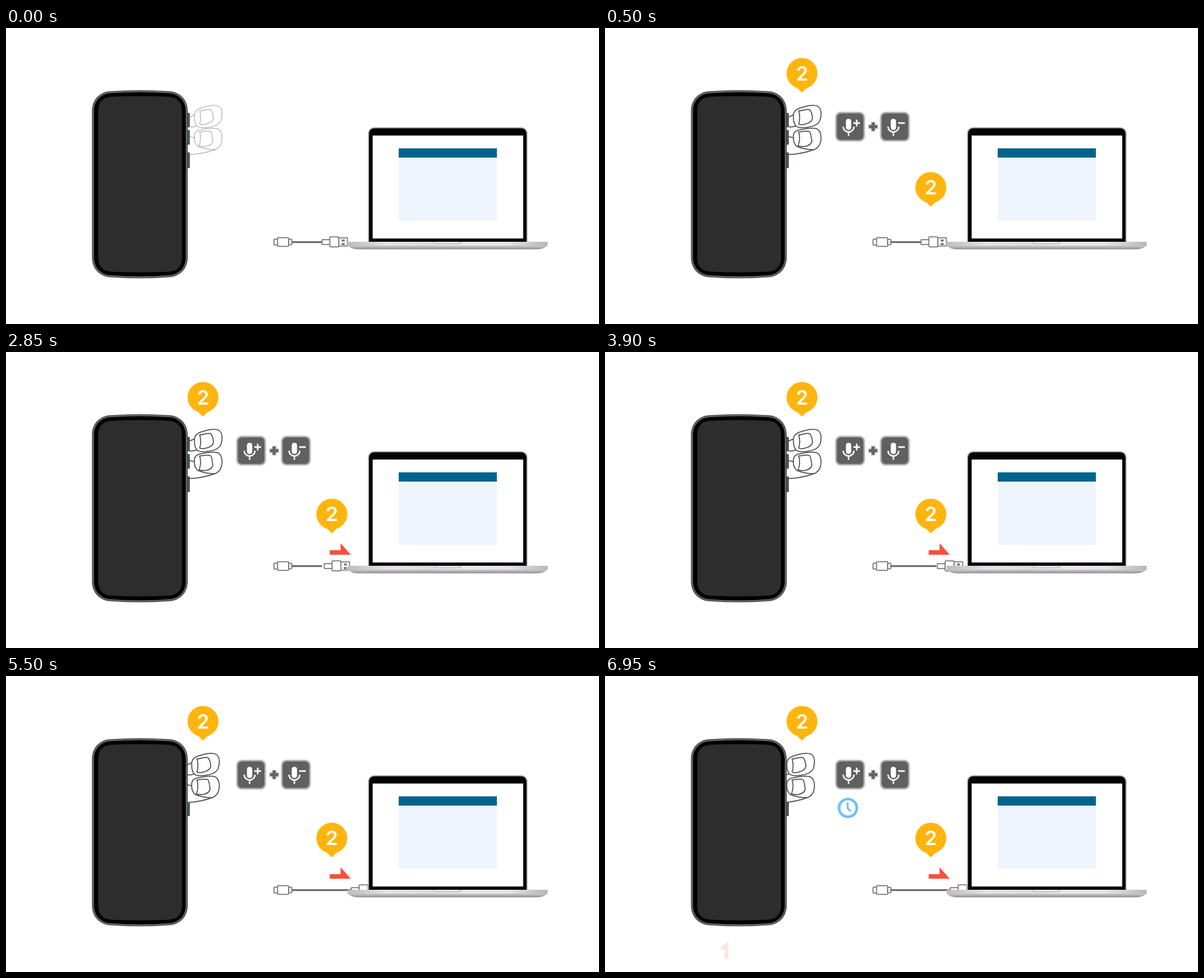
An HTML page with a canvas that plays this animation: 900x450 px, repeating every 8 s.

```html
<!DOCTYPE html>
<html lang="en">
<head>
<meta charset="utf-8">
<title>Connect the phone</title>
<style>
html, body { margin: 0; width: 100%; height: 100%; overflow: hidden; background: #fff; }
canvas { display: block; width: 900px; height: 450px; }
</style>
</head>
<body>
<canvas id="stage" width="900" height="450"></canvas>
<script>
const ctx = document.getElementById('stage').getContext('2d');
const LOOP = 8000, STEP = 50;
const RED = '#fa4f3b', LINE = '#4d4d4f', METAL = '#747476';

const ramp = (t, a, b) => Math.min(1, Math.max(0, (t - a) / (b - a)));
const easeOut = (p, n = 2) => 1 - Math.pow(1 - p, n);

function paint(path, fill, stroke, width = 1.5) {
  if (fill) { ctx.fillStyle = fill; ctx.fill(path); }
  if (stroke) { ctx.strokeStyle = stroke; ctx.lineWidth = width; ctx.stroke(path); }
}

function box(x, y, w, h, r, fill, stroke, width) {
  const p = new Path2D();
  p.roundRect(x, y, w, h, r);
  paint(p, fill, stroke, width);
}

function svg(d, fill, stroke, width) { paint(new Path2D(d), fill, stroke, width); }

function layer(alpha, x, y, draw) {
  if (alpha <= 0) return;
  ctx.save();
  ctx.globalAlpha = alpha;
  ctx.translate(x, y);
  draw();
  ctx.restore();
}

function gradient(x0, y0, x1, y1, ...colors) {
  const g = ctx.createLinearGradient(x0, y0, x1, y1);
  colors.forEach((c, i) => g.addColorStop(i / (colors.length - 1), c));
  return g;
}

// Rounded slab whose top and bottom edges bulge slightly.
function slab(x0, y0, x1, y1, r, bulge, fill) {
  const a = y0 + bulge, b = y1 - bulge, mid = (x0 + x1) / 2;
  const p = new Path2D();
  p.moveTo(x0, a + r);
  p.bezierCurveTo(x0, a + r * .42, x0 + r * .42, a, x0 + r, a);
  p.quadraticCurveTo(mid, y0 - bulge, x1 - r, a);
  p.bezierCurveTo(x1 - r * .42, a, x1, a + r * .42, x1, a + r);
  p.lineTo(x1, b - r);
  p.bezierCurveTo(x1, b - r * .42, x1 - r * .42, b, x1 - r, b);
  p.quadraticCurveTo(mid, y1 + bulge, x0 + r, b);
  p.bezierCurveTo(x0 + r * .42, b, x0, b - r * .42, x0, b - r);
  p.closePath();
  paint(p, fill);
}

function sideKeys() {
  for (const [y, h] of [[129, 22], [155, 22.5], [189, 24]]) {
    box(272, y, 7, h, 1.5, '#4a5359');
  }
}

function phone() {
  slab(130.5, 94.5, 275.8, 380.5, 30, 1.5, '#47494b');
  slab(131.8, 95.8, 274.5, 379.2, 29, 1.5, '#6a6c6e');
  slab(133.5, 97.5, 272.8, 377.5, 27, 1.5, '#000');
  slab(140, 103.5, 267, 371.5, 20, 1, '#2d2d2d');
}

function hand() {
  ctx.lineJoin = ctx.lineCap = 'round';
  ctx.fillStyle = '#fff';
  ctx.fillRect(279, 128, 12, 62);
  svg('M279 192.5 C292 192 306 189 317 185 L290 180 L279 180 Z', '#fff');
  svg('M278 192.5 C292 192 306 189 317 185', null, LINE);
  svg('M279 135 Q282 134 286 132 M279 150.5 Q284 151 289 149 M279 165 L286 167', null, LINE);
  svg('M286 136 C285 128 290 123 298 121 C306 118 317 116 323 119 C329 123 329 133 326 141 C323 148 315 150 307 151 C300 152 293 152 290 149 C287 146 286 141 286 136 Z', '#fff', LINE);
  svg('M294 126 C300 126 305 123 310 124 C314 126 314 132 315 137 C314 142 309 145 304 146 Q298 148 294 146 C296 140 296 133 294 126 Z', '#fff', LINE);
  svg('M286 168 C285 160 288 156 295 155 C303 153 314 151 321 153 C328 156 329 166 327 174 Q325 182 317 185 C309 185 298 183 291 180 C288 177 286 173 286 168 Z', '#fff', LINE);
  svg('M294 158 C300 158 307 155 311 158 C313 162 313 167 314 172 C313 177 309 179 304 180 Q298 181 293 179 C296 172 296 165 294 158 Z', '#fff', LINE);
}

function pin() {
  svg('M-10 19 L-1.5 28 Q0 29.5 1.5 28 L10 19 Z', '#ffb50e');
  box(-23.5, -23.5, 47, 47, 23.5, '#ffb50e');
  ctx.fillStyle = '#fff';
  ctx.font = '600 30px Inter, "Open Sans", sans-serif';
  ctx.textAlign = 'center';
  ctx.fillText('2', 0, 10.5);
}

function micKey(x, plus) {
  layer(ctx.globalAlpha, x, 150, () => {
    box(-23.5, -23.5, 47, 47, 9, '#e3e3e3');
    box(-22, -22, 44, 44, 8, '#a5a5a5');
    box(-20, -20, 40, 40, 6, '#606060');
    ctx.lineCap = 'butt';
    box(-6.3, -12, 8, 17, 4, '#fff');
    svg('M-10.5 0 A8.2 8.2 0 0 0 5.9 0 M-2.3 8 V14', null, '#fff', 2.2);
    svg('M5 -5.5 H15' + (plus ? ' M10 -10.5 V-.5' : ''), null, '#fff', 2.4);
  });
}

function keys() {
  micKey(372, true);
  micKey(440, false);
  svg('M399.5 150 H414.5 M407 142.5 V157.5', null, '#dedede', 7);
  svg('M400.5 150 H413.5 M407 143.5 V156.5', null, '#656565', 5);
}

function cable(reach) {
  ctx.lineCap = 'butt';
  ctx.lineJoin = 'miter';
  svg(`M434 325.5 H${479.5 + reach}`, null, METAL, 3);
  box(406.7, 321, 6, 9, 1, '#fff', METAL, 1.5);
  box(412.2, 318.7, 16.8, 13.3, 1, '#fff', METAL, 1.5);
  box(429, 321.2, 4.8, 8.4, .5, '#fff', METAL, 1.5);
}

function plug() {
  box(479.7, 321.7, 12, 7.6, .5, '#fff', METAL, 1.5);
  box(505, 319, 13.2, 12.6, .5, '#fff', METAL, 1.5);
  box(491.5, 317.6, 13.5, 15.2, 1, '#fff', METAL, 1.5);
  ctx.fillStyle = METAL;
  ctx.fillRect(509.5, 321.5, 4.5, 3);
  ctx.fillRect(509.5, 327, 4.5, 3);
}

function laptop() {
  box(549.5, 151, 242, 176, [9, 9, 0, 0], '#a3a3a5');
  box(551, 152.5, 239, 174, [8, 8, 0, 0], '#050505');
  ctx.fillStyle = '#fff';
  ctx.fillRect(556.5, 163.5, 228.5, 156.5);
  ctx.fillStyle = '#eff4fd';
  ctx.fillRect(596, 196, 149, 97);
  ctx.fillStyle = '#00638d';
  ctx.fillRect(596, 183, 149, 14);
  svg('M518.5 325 H822 V331 Q816 336.5 804 336.5 H536 Q524 336.5 518.5 331 Z',
    gradient(0, 325, 0, 337, '#ececee', '#d6d4d7', '#b9b6ba', '#858388'));
  svg('M518.5 325 H822 V331 H518.5 Z',
    gradient(518, 0, 822, 0, '#bdbbbf', '#e5e3e6', '#dddbde', '#e9e7ea', '#e5e3e6', '#b9b7bb'));
  svg('M648 325 H692 Q691 329 686 329 H654 Q649 329 648 325 Z', '#c8c6ca');
  svg('M650 325 H690 L687 327.5 H653 Z', '#e3e1e4');
}

function arrow() {
  svg('M0 10.5 H16.5 V0 L32 17.5 H0 Z', RED);
}

function clock() {
  box(-13.5, -13.5, 27, 27, 13.5, '#fff', '#72c3f1', 4.2);
  ctx.lineCap = 'butt';
  ctx.lineJoin = 'miter';
  svg('M-.5 -8.5 V.5 L4.5 5.5', null, '#72c3f1', 3);
}

function draw(t) {
  ctx.clearRect(0, 0, 900, 450);

  const intro = ramp(t, 0, 350);
  const press = easeOut(ramp(t, 5300, 6150));
  const nudge = easeOut(ramp(t, 2000, 2850));
  const push = easeOut(ramp(t, 3700, 4350));

  sideKeys();
  layer(.34 + .66 * intro, -10 * press, 0, hand);
  phone();
  layer(intro, 299, 69, pin);
  layer(intro, 0, 0, keys);

  cable(45 * push);
  layer(1, 3.3 * nudge + 41.2 * push, 0, plug);
  laptop();

  const drop = easeOut(ramp(t, 50, 950), 3);
  layer(intro, 494.5, 246.5 - 32 * (1 - drop), pin);
  layer(Math.pow(ramp(t, 850, 1650), 2), 465.3 + 26 * nudge, 290.7, arrow);

  if (t >= 6350) layer(1, 368.7, 200.5, clock);
  layer(.15 * ramp(t, 6550, 6950), 187.2, 430, () => {
    ctx.rotate(-Math.PI / 2);
    ctx.scale(.87, .78);
    ctx.translate(0, -17.5);
    arrow();
  });
}

const start = performance.now();
function tick() {
  const t = (performance.now() - start) % LOOP;
  draw(Math.floor(t / STEP) * STEP);
  requestAnimationFrame(tick);
}
tick();
</script>
</body>
</html>
```
